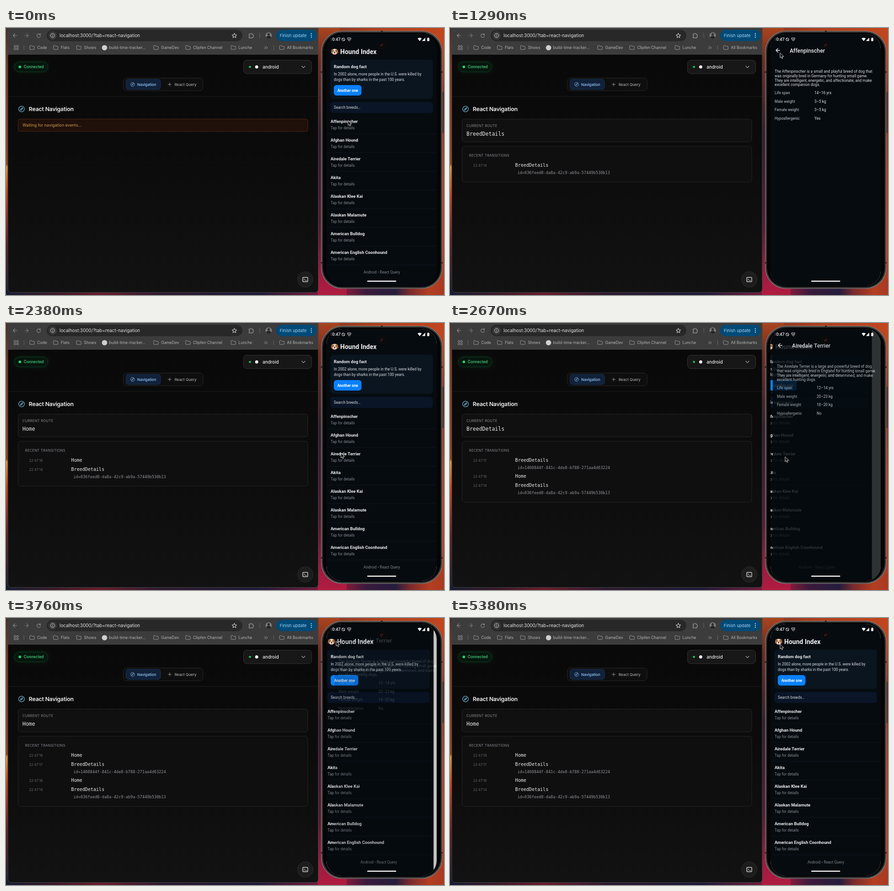
Recreate the animation shown at these times as an HTML page with a canvas. Size 958 by 585 pixels, loop 5430 ms.

```html
<!DOCTYPE html>
<html lang="en">
<head>
<meta charset="utf-8">
<title>Navigation devtools</title>
<style>
html, body { margin: 0; width: 100%; height: 100%; overflow: hidden; background: #000; }
canvas { display: block; width: 958px; height: 585px; }
</style>
</head>
<body>
<canvas id="stage"></canvas>
<script>
const W = 958, H = 585, LOOP = 5430;
const canvas = document.getElementById('stage');
const ratio = window.devicePixelRatio || 1;
canvas.width = W * ratio;
canvas.height = H * ratio;
const ctx = canvas.getContext('2d');

const UI = 'Inter, sans-serif', PHONE = 'Roboto, sans-serif', MONO = '"DejaVu Sans Mono", monospace';
const SCREEN = { x: 701, y: 13, w: 241, h: 552, r: 33 };
const SLIDE = SCREEN.w / 10;

const BREEDS = ['Affenpinscher', 'Afghan Hound', 'Airedale Terrier', 'Akita', 'Alaskan Klee Kai',
  'Alaskan Malamute', 'American Bulldog', 'American English Coonhound'];

const AFFEN = {
  name: 'Affenpinscher',
  lines: ['The Affenpinscher is a small and playful breed of dog that',
    'was originally bred in Germany for hunting small game.',
    'They are intelligent, energetic, and affectionate, and make',
    'excellent companion dogs.'],
  values: ['14–16 yrs', '3–5 kg', '3–5 kg', 'Yes']
};
const AIREDALE = {
  name: 'Airedale Terrier',
  lines: ['The Airedale Terrier is a large and powerful breed of dog',
    'that was originally bred in England for hunting small game.',
    'They are intelligent, energetic, and determined, and make',
    'excellent hunting dogs.'],
  values: ['12–14 yrs', '20–23 kg', '18–20 kg', 'No']
};

const EVENTS = [
  { at: 470, open: true, breed: AFFEN, time: '22:47:14', route: 'BreedDetails', id: '036feed0-da8a-42c9-ab9a-57449b530b13' },
  { at: 1615, open: false, breed: AFFEN, time: '22:47:16', route: 'Home' },
  { at: 2552, open: true, breed: AIREDALE, time: '22:47:17', route: 'BreedDetails', id: '1460844f-841c-4de8-b788-271aa4d63224' },
  { at: 3660, open: false, breed: AIREDALE, time: '22:47:19', route: 'Home' }
];

// time, x, y of the pointer tip
const POINTER = [
  [0, 748, 203], [300, 748, 203], [450, 747, 207], [850, 747, 207], [1260, 722, 55],
  [1990, 722, 56], [2430, 733, 293.5], [3090, 733, 293.5], [3570, 722, 51],
  [4500, 722, 51], [4720, 722, 57.5], [LOOP, 722, 57.5]
];

const clamp = v => Math.min(1, Math.max(0, v));
const mix = (a, b, k) => a + (b - a) * k;
const cubic = (a, b, c, d, s) => {
  const u = 1 - s;
  return a * u * u * u + 3 * b * u * u * s + 3 * c * u * s * s + d * s * s * s;
};

// Two-part curve: quick start, very long settling
function slowSettle(k) {
  if (k <= 0) return 0;
  if (k >= 1) return 1;
  const first = k < 1 / 6;
  const xs = first ? [0, .05, .13333, 1 / 6] : [1 / 6, .20833, .25, 1];
  const ys = first ? [0, 0, .06, .4] : [.4, .82, 1, 1];
  let lo = 0, hi = 1;
  for (let i = 0; i < 24; i++) {
    const mid = (lo + hi) / 2;
    if (cubic(...xs, mid) < k) lo = mid; else hi = mid;
  }
  return cubic(...ys, lo);
}

function text(str, x, y, size, color, { weight = 400, font = UI, align = 'left', spacing = 0 } = {}) {
  ctx.font = `${weight} ${size}px ${font}`;
  ctx.letterSpacing = spacing + 'px';
  ctx.textAlign = align;
  ctx.fillStyle = color;
  ctx.fillText(str, x, y + size * .36);
}

function paint(fill, stroke, width = 1) {
  if (fill) { ctx.fillStyle = fill; ctx.fill(); }
  if (stroke) { ctx.strokeStyle = stroke; ctx.lineWidth = width; ctx.stroke(); }
}
function box(x, y, w, h, r, fill, stroke, width) {
  ctx.beginPath();
  ctx.roundRect(x, y, w, h, r);
  paint(fill, stroke, width);
}
function circle(x, y, r, fill, stroke, width) {
  ctx.beginPath();
  ctx.arc(x, y, r, 0, Math.PI * 2);
  paint(fill, stroke, width);
}
function ellipse(x, y, rx, ry, turn, fill) {
  ctx.beginPath();
  ctx.ellipse(x, y, rx, ry, turn, 0, Math.PI * 2);
  paint(fill);
}
function path(d, x, y, fill, stroke, width = 1) {
  ctx.save();
  ctx.translate(x, y);
  const shape = new Path2D(d);
  ctx.lineCap = ctx.lineJoin = 'round';
  if (fill) { ctx.fillStyle = fill; ctx.fill(shape); }
  if (stroke) { ctx.strokeStyle = stroke; ctx.lineWidth = width; ctx.stroke(shape); }
  ctx.restore();
}
function gradient(x0, y0, x1, y1, stops) {
  const g = ctx.createLinearGradient(x0, y0, x1, y1);
  stops.forEach(([at, color]) => g.addColorStop(at, color));
  return g;
}
function rect(x, y, w, h, fill) {
  ctx.fillStyle = fill;
  ctx.fillRect(x, y, w, h);
}

function drawWallpaper() {
  rect(0, 0, 6, H, gradient(0, 0, 0, H, [[0, '#4a2a24'], [.15, '#7c3a1e'], [.51, '#94441c'],
    [.52, '#e0922c'], [.62, '#c8461c'], [.8, '#641f24'], [1, '#121c34']]));
  rect(0, 576, 690, 9, gradient(0, 0, 690, 0, [[0, '#141c34'], [.15, '#3a1828'], [.3, '#6a1c2a'], [.5, '#2c1830'], [.8, '#1c1a38'], [1, '#7a1a3c']]));
  rect(682, 0, 276, H, gradient(0, 0, 0, H, [[0, '#a8441f'], [.12, '#742a20'], [.4, '#341c2e'], [.75, '#5a1a34'], [.92, '#a01a40'], [1, '#b01c40']]));
  rect(730, 0, 228, 60, gradient(730, 0, 958, 0, [[0, '#94391f'], [.4, '#b0421e'], [1, '#c0461e']]));
  rect(930, 50, 28, H, gradient(0, 50, 0, H, [[0, '#c0461e'], [.2, '#8a3022'], [.5, '#b03c20'], [.8, '#b83e20'], [1, '#a83a22']]));
  rect(745, 550, 213, 35, gradient(745, 0, 958, 0, [[0, '#801a3a'], [.2, '#3a1a3c'], [.5, '#241c3c'], [.65, '#7a2a2c'], [.85, '#b43e20'], [1, '#a83a22']]));
}

function drawFolder(x, label) {
  path('M-5 -3.5q0-1 1-1h2.6l1.4 1.5h4q1 0 1 1v5q0 1-1 1h-8q-1 0-1-1z', x, 43, null, '#a2a2a2', .9);
  text(label, x + 11.3, 43, 8.5, '#b4b4b4');
}

function drawToolbar() {
  rect(4, 0, 679, 58, '#3c3c3c');
  rect(4, 57.5, 679, .8, '#4a4a4a');
  path('M4 0H-4M0-4L-4 0L0 4', 19.5, 16.5, null, '#8b8b8b', 1.1);
  path('M-4 0H4M0-4L4 0L0 4', 45, 16.5, null, '#777', 1.1);
  path('M3.3-2A4 4 0 1 0 4 1M3.8-4.3V-1.5H1', 71.5, 16.5, null, '#8f8f8f', 1.1);
  box(89, 4, 428, 25, 12.5, '#282828');
  circle(102, 16.5, 9, '#3b3b3b');
  circle(102, 16.5, 4.4, null, '#d0d0d0', 1);
  path('M0-.3V2.2M0-2.2V-2', 102, 16.5, null, '#d0d0d0', 1);
  text('localhost:3000/?tab=react-navigation', 117, 16.5, 9.9, '#e4e4e4');
  path('M0-5L1.5-1.6L5-1.3L2.4 1.1L3.1 4.6L0 2.8L-3.1 4.6L-2.4 1.1L-5-1.3L-1.5-1.6Z', 499.5, 16.5, null, '#d0d0d0', 1.1);
  path('M-4.5-3.3h2.8a1.5 1.5 0 0 1 3 0h2.7v2.7a1.5 1.5 0 0 1 0 3v2.7h-8.5v-2.7a1.5 1.5 0 0 0 0-3z', 536, 16.5, null, '#9f9f9f', 1.1);
  rect(554.5, 11, 1, 11, '#646464');

  ctx.save();
  circle(574.5, 16.5, 7, '#77797a');
  ctx.clip();
  circle(574.5, 14, 2.7, '#303030');
  ellipse(574.5, 22, 5.5, 5, 0, '#252525');
  ctx.restore();

  box(591, 4, 88, 25, 12.5, '#004a77');
  text('Finish update', 598.8, 16.5, 9.25, '#a9d4f2');
  [-4, 0, 4].forEach(d => circle(667.8, 16.5 + d, 1.15, '#b9dcf4'));

  for (const x of [17.7, 23.4]) for (const y of [38.4, 44.1]) box(x, y, 3.6, 3.6, .5, null, '#a2a2a2', .9);
  rect(38.8, 38, 1, 10, '#676767');
  [[57, 'Code'], [108.7, 'Flats'], [159.2, 'Shows'], [328, 'GameDev'], [398, 'Clipfen Channel'], [497.2, 'Lunche']]
    .forEach(([x, label]) => drawFolder(x, label));
  circle(215.5, 43.2, 5.8, '#cfcfcf');
  text('build-time-tracker...', 225.5, 43, 8.5, '#b4b4b4');
  path('M-3-2.6L-.4 0L-3 2.6M.8-2.6L3.4 0L.8 2.6', 568.5, 43.2, null, '#a8a8a8', 1);
  rect(585, 38, 1, 10, '#676767');
  drawFolder(603.3, 'All Bookmarks');
}

function drawCompass(x, y, r, color) {
  circle(x, y, r, null, color, r * .18);
  path(`M${r * .45} ${-r * .45}L${r * .17} ${r * .17}L${-r * .45} ${r * .45}L${-r * .17} ${-r * .17}Z`, x, y, null, color, r * .17);
}

function drawHeader() {
  ctx.save();
  ctx.shadowColor = 'rgba(34,197,94,.14)';
  ctx.shadowBlur = 9 * ratio;
  box(18.5, 74.5, 73, 21.5, 10.8, '#07160e', '#0f3a21');
  ctx.restore();
  circle(30.3, 85.2, 2.9, '#22d066');
  text('Connected', 38.8, 85.2, 8.35, '#48dc84', { weight: 500 });

  box(519.5, 70.5, 149, 29.5, 7, '#171717', '#343434');
  circle(533.5, 85.2, 2.3, '#22c55e');
  circle(548.3, 85.2, 3.5, '#eee');
  text('android', 561.3, 85.2, 9.75, '#ededed', { weight: 500 });
  path('M-3.6-1.8L0 1.8L3.6-1.8', 650.5, 85.3, null, '#aaa', 1.1);

  box(256.5, 109.5, 174.5, 28, 7, '#0e0e0e', '#262626');
  box(262.5, 112.5, 75.5, 22, 5, '#11213a', '#193254');
  drawCompass(276.9, 123.6, 4.3, '#9ccbfa');
  text('Navigation', 287, 123.6, 8.15, '#9ccbfa', { weight: 500 });
  path('M-3.6 0H3.6M0-3.6V3.6', 358, 123.6, null, '#a0a0a0', .9);
  text('React Query', 368.7, 123.6, 8.15, '#a5a5a8', { weight: 500 });
  rect(5, 149.5, 678, 1, '#1e1e1e');
}

function drawTransitions(events) {
  const rowHeight = e => e.id ? 35 : 20;
  const height = 43.5 + events.reduce((sum, e) => sum + rowHeight(e), 0);
  box(26.5, 199.5, 633.5, 50, 4.5, '#101011', '#262627');
  text('CURRENT ROUTE', 36, 214.2, 7.45, '#8f8f94', { spacing: .36 });
  text(events[0].route, 36, 231.5, 11.5, '#ececec', { font: MONO });
  box(26.5, 259, 633.5, height, 4.5, '#0f0f10', '#242425');
  text('RECENT TRANSITIONS', 41.8, 279.2, 7.45, '#8f8f94', { spacing: .36 });
  let y = 300.7;
  for (const e of events) {
    text(e.time, 50.5, y + .2, 7.5, '#67676c');
    text(e.route, 142.6, y, 10.05, '#ececec', { font: MONO });
    if (e.id) text('id=' + e.id, 147.4, y + 16, 8.63, '#929297', { font: MONO });
    y += rowHeight(e);
  }
}

function drawBrowser(t) {
  box(4, -8, 679, 587.5, [0, 0, 7, 7], gradient(0, 58, 0, 580, [[0, '#090909'], [.4, '#0b0b0b'], [1, '#121213']]));
  drawToolbar();
  drawHeader();
  drawCompass(34, 177.5, 6.2, '#7bd0f7');
  text('React Navigation', 49.8, 177.5, 12.35, '#f0f0f0', { weight: 600, spacing: -.2 });

  const seen = EVENTS.filter(e => t >= e.at + 10).reverse();
  if (seen.length) drawTransitions(seen);
  else {
    box(26.5, 199.5, 633.5, 27, 4, '#20100a', '#4a2713');
    text('Waiting for navigation events…', 36, 213.2, 8.9, '#d19a4c');
  }

  circle(654.5, 551, 17, '#1d1d1e', '#2d2d2e');
  box(649, 546.3, 11, 9.6, 1.3, null, '#f0f0f0', 1.2);
  path('M-3-1.8L-1.2 0L-3 1.8M.3 2.1H2.8', 654.5, 551, null, '#f0f0f0', 1);
  box(4, -8, 679, 587.5, [0, 0, 7, 7], null, '#464646', 1);
}

function drawDog(x, y) {
  ellipse(x, y, 6.2, 6.4, 0, '#ead6bd');
  ellipse(x - 5.3, y - 1.2, 2.3, 5, .25, '#a9683b');
  ellipse(x + 5.3, y - 1.2, 2.3, 5, -.25, '#a9683b');
  ellipse(x, y + 2, 3.4, 3, 0, '#fff4e5');
  ellipse(x, y + 4.8, 1.4, 2, 0, '#ea5c70');
  ellipse(x, y + 1.3, 1.8, 1.3, 0, '#241a18');
  circle(x - 2.5, y - 1.8, 1, '#241a18');
  circle(x + 2.5, y - 1.8, 1, '#241a18');
}

function drawHome() {
  const font = PHONE;
  rect(SCREEN.x, 0, SCREEN.w, H, '#060b10');
  drawDog(718.8, 52);
  text('Hound Index', 731, 52, 14, '#f1f3f5', { weight: 700, font });
  box(709.7, 69.5, 224, 85.5, 7, '#0b1520');
  text('Random dog fact', 717, 84.3, 9.4, '#eef0f2', { weight: 600, font });
  text('In 2002 alone, more people in the U.S. were killed by', 717, 100.7, 8.35, '#d9dde2', { font });
  text('dogs than by sharks in the past 100 years.', 717, 112.7, 8.35, '#d9dde2', { font });
  box(717, 125, 60.5, 23, 6, '#0a80fa');
  text('Another one', 747.3, 136.7, 8.25, '#fff', { weight: 600, font, align: 'center' });
  box(709.7, 162, 224, 24, 6, '#0a1527');
  text('Search breeds…', 717, 174.3, 8.3, '#d3d7dc', { font });
  BREEDS.forEach((breed, i) => {
    const y = 204.5 + 41 * i;
    text(breed, 710, y, 9.35, '#eceef0', { weight: 600, font });
    text('Tap for details', 710, y + 14.4, 8.3, '#858b92', { font });
    rect(SCREEN.x, y + 27, SCREEN.w, .8, '#111920');
  });
  text('Android • React Query', 822, 535.4, 8.25, '#7f858c', { font, align: 'center' });
}

function drawDetails(breed) {
  const font = PHONE;
  rect(SCREEN.x, 0, SCREEN.w, H, '#050b0f');
  path('M4.3 0H-4M0-4.2L-4.2 0L0 4.2', 717.2, 49, null, '#f0f0f0', 1.3);
  text(breed.name, 743, 49.2, 12.2, '#eceef0', { weight: 500, font });
  breed.lines.forEach((line, i) => text(line, 710, 95 + 9.75 * i, 8.35, '#dcdfe3', { font }));
  ['Life span', 'Male weight', 'Female weight', 'Hypoallergenic'].forEach((label, i) => {
    const y = 142.5 + 18.5 * i;
    text(label, 710, y, 8.2, '#99a0a8', { weight: 500, font });
    text(breed.values[i], 797, y, 8.3, '#e2e5e8', { font });
  });
}

function shifted(dx, draw) {
  ctx.save();
  ctx.translate(dx, 0);
  draw();
  ctx.restore();
}

// Keeps the picture under the details so that they fade as one layer
const backdrop = document.createElement('canvas');
backdrop.width = canvas.width;
backdrop.height = canvas.height;
const backdropCtx = backdrop.getContext('2d');

function drawScreens(t) {
  const event = EVENTS.filter(e => t >= e.at).pop();
  if (!event) return drawHome();
  const elapsed = t - event.at;
  const k = slowSettle(elapsed / 450);
  const opened = event.open ? k : 1 - k;
  const alpha = event.open ? clamp((elapsed - 50) / 83) : 1 - clamp((elapsed - 35) / 83);
  rect(SCREEN.x, 0, SCREEN.w, H, '#f2f2f2');
  shifted(-SLIDE * opened, drawHome);
  if (alpha === 0) return;
  if (alpha < 1) backdropCtx.drawImage(canvas, 0, 0);
  shifted(SLIDE * (1 - opened), () => drawDetails(event.breed));
  if (alpha < 1) {
    ctx.globalAlpha = 1 - alpha;
    ctx.drawImage(backdrop, 0, 0, W, H);
    ctx.globalAlpha = 1;
  }
}

function drawStatusBar() {
  text('10:47', 708.3, 25, 9.3, '#f2f2f2', { weight: 500, font: PHONE });
  rect(701, 18, 10.5, 12, '#050a0e');
  circle(737.8, 25, 3.2, null, '#e8e8e8', 1);
  path('M-2.6-2.6L2.6 2.6', 737.8, 25, null, '#e8e8e8', 1);
  path('M-3.6-3.2H3.6L2.6 1L0 3.8L-2.6 1Z', 750.8, 25, null, '#e8e8e8', 1);
  path('M-1.6-1H1.6L0 1.4Z', 750.8, 25, '#e8e8e8');
  path('M-4.4-2.2Q0-5 4.4-2.2L0 3.8Z', 904.8, 25, '#fff');
  path('M3.3-3.8V3.6H-3.7Z', 913.6, 25, '#fff');
  box(921.3, 22, 4.6, 6.8, .8, '#fff');
  rect(922.6, 20.9, 2, 1.4, '#fff');
}

function drawPhone(t) {
  rect(688.5, 95, 3, 4, '#222');
  rect(953, 140, 3.5, 90, '#25201f');
  box(690, 7, 264, 563.5, 45, '#151515', '#777876', 1.6);
  box(692.3, 9.3, 259.4, 559, 43, '#050505', '#3d3e3d', 1.6);
  for (const y of [95, 513]) {
    rect(689, y, 4, 3, '#252525');
    rect(951, y, 4, 3, '#252525');
  }
  rect(820, 6, 4, 3, '#222');

  ctx.save();
  box(SCREEN.x, SCREEN.y, SCREEN.w, SCREEN.h, SCREEN.r);
  ctx.clip();
  drawScreens(t);
  drawStatusBar();
  box(790, 553.6, 63.5, 2.4, 1.2, '#f4f4f4');
  ctx.restore();

  circle(821.8, 37, 8.6, '#0a0909', '#191515', .8);
  circle(821.8, 37, 4, '#181011');
  ellipse(820.3, 38.5, 1.3, .8, -.8, '#663238');
  ellipse(823.5, 35.5, 1.2, .7, -.8, '#4b3034');
}

function drawPointer(t) {
  const next = Math.max(1, POINTER.findIndex(p => p[0] > t));
  const a = POINTER[next - 1], b = POINTER[next];
  const k = clamp((t - a[0]) / (b[0] - a[0]));
  const eased = k * k * (3 - 2 * k);
  path('M0 0V10.3L2.4 8.2L4 12L5.9 11.2L4.3 7.5H7.5Z', mix(a[1], b[1], eased), mix(a[2], b[2], eased), '#080808', '#e6e6e6', .9);
}

function frame(now) {
  const t = now % LOOP;
  ctx.setTransform(ratio, 0, 0, ratio, 0, 0);
  rect(0, 0, W, H, '#1a1428');
  drawWallpaper();
  drawBrowser(t);
  drawPhone(t);
  drawPointer(t);
  requestAnimationFrame(frame);
}
requestAnimationFrame(frame);
</script>
</body>
</html>
```
